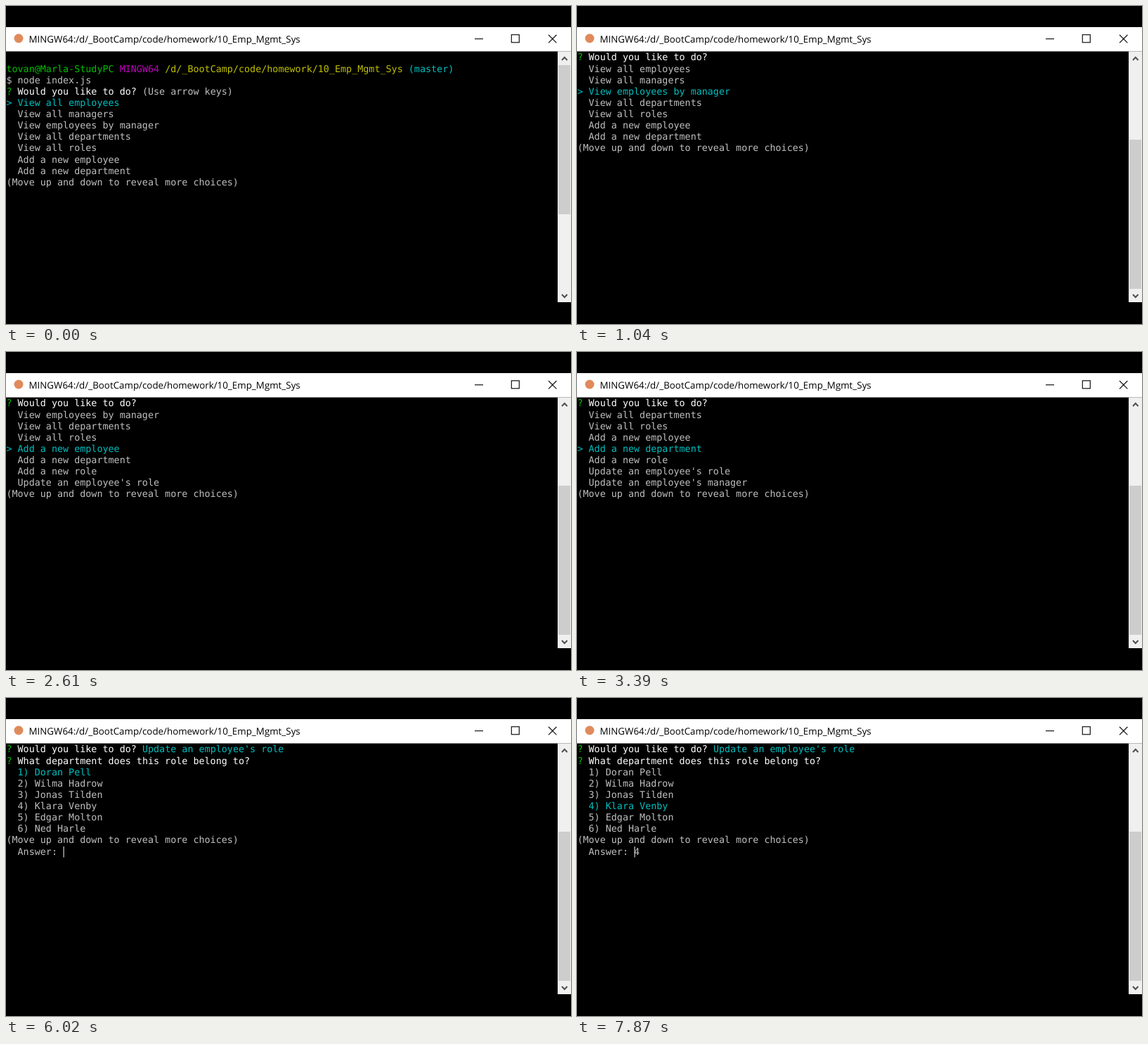
An HTML page that plays this animation: 804 px wide and 452 px high, repeating every 8000 ms.

```html
<!DOCTYPE html>
<html lang="en">
<head>
<meta charset="utf-8">
<title>Terminal menu</title>
<style>
  html, body { margin: 0; width: 100%; height: 100%; overflow: hidden; background: #000; }
  svg { display: block; width: 804px; height: 452px; }
  text { white-space: pre; text-rendering: geometricPrecision; }
  #title { font: 13.35px "Open Sans", "Noto Sans", sans-serif; fill: #000; }
  #lines { font: 13.4px "DejaVu Sans Mono", "Liberation Mono", monospace; }
  .gray { fill: #bfbfbf; }
  .white { fill: #fff; }
  .green { fill: #00bf00; }
  .cyan { fill: #00bfbf; }
  .yellow { fill: #bfbf00; }
  .magenta { fill: #bf00bf; }
</style>
</head>
<body>
<svg viewBox="0 0 804 452">
  <rect width="804" height="452"/>
  <rect y="30" width="804" height="34.5" fill="#fff"/>
  <circle cx="18" cy="46" r="6.5" fill="#e08a5c"/>
  <text id="title" x="32.5" y="51.7">MINGW64:/d/_BootCamp/code/homework/10_Emp_Mgmt_Sys</text>
  <g fill="none" stroke="#111" stroke-width="1.2">
    <path d="M667 46.7h12"/>
    <rect x="719.3" y="40.8" width="11" height="11"/>
    <path d="M772 41l11.4 11.4M783.4 41l-11.4 11.4"/>
  </g>
  <rect x="785" y="64.5" width="19" height="356.5" fill="#f0f0f0"/>
  <rect id="thumb" x="786" width="17" height="212" fill="#cdcdcd"/>
  <path d="M791 77l3.8-4 3.8 4M791 410l3.8 4 3.8-4" fill="none" stroke="#505050" stroke-width="2"/>
  <g id="lines"></g>
  <rect id="caret" x="81.5" y="211" width="1.2" height="15.5" fill="#d0d0d0"/>
</svg>
<script>
const LOOP = 8000, TOP = 77.4, PITCH = 16.13, LEFT = 0.4;
const NS = "http://www.w3.org/2000/svg";
const $ = id => document.getElementById(id);

const actions = [
  "View all employees", "View all managers", "View employees by manager",
  "View all departments", "View all roles", "Add a new employee",
  "Add a new department", "Add a new role", "Update an employee's role",
  "Update an employee's manager", "Delete an employee", "Exit"
];
const people = [
  "Doran Pell", "Wilma Hadrow", "Jonas Tilden",
  "Klara Venby", "Edgar Molton", "Ned Harle"
];

// A line is a list of [colour, text] runs.
const more = [["gray", "(Move up and down to reveal more choices)"]];
const ask = (text, ...rest) => [["green", "? "], ["white", text], ...rest];
const question = "Would you like to do?";

// Seven choices are visible; the pointer stays on the fourth once it gets there.
function choices(selected) {
  const first = Math.max(0, selected - 3);
  return actions.slice(first, first + 7).map((name, i) =>
    first + i === selected ? [["cyan", "> " + name]] : [["gray", "  " + name]]);
}

const start = () => [
  [],
  [["green", "tovan@Marla-StudyPC "], ["magenta", "MINGW64 "],
   ["yellow", "/d/_BootCamp/code/homework/10_Emp_Mgmt_Sys "], ["cyan", "(master)"]],
  [["gray", "$ node index.js"]],
  ask(question, ["gray", " (Use arrow keys)"]),
  ...choices(0),
  more
];
const menu = selected => () => [ask(question), ...choices(selected), more];
const pick = (selected, answer = "") => () => [
  ask(question, ["cyan", " Update an employee's role"]),
  ask("What department does this role belong to?"),
  ...people.map((name, i) => [[i === selected ? "cyan" : "gray", `  ${i + 1}) ${name}`]]),
  more,
  [["gray", "  Answer: " + answer]]
];

// [start time, screen, caret shown]
const steps = [
  [0, start],
  [520, () => [more]],
  [650, menu(1)],
  [780, menu(2)],
  [1300, menu(3)],
  [2090, menu(4)],
  [2610, menu(5)],
  [3390, menu(6)],
  [4040, menu(7)],
  [4560, menu(8)],
  [6020, pick(0), true],
  [6550, pick(0), false],
  [6940, pick(0), true],
  [7340, pick(1, "2"), true],
  [7600, pick(2, "3"), true],
  [7870, pick(3, "4"), true]
];

function textLine(runs, row) {
  const line = document.createElementNS(NS, "text");
  line.setAttribute("x", LEFT);
  line.setAttribute("y", TOP + row * PITCH);
  for (const [colour, text] of runs) {
    const run = document.createElementNS(NS, "tspan");
    run.setAttribute("class", colour);
    run.textContent = text;
    line.append(run);
  }
  return line;
}

let shown = -1;
function draw() {
  const t = performance.now() % LOOP;
  const index = steps.findLastIndex(step => step[0] <= t);
  if (index !== shown) {
    const [, screen, caret] = steps[index];
    $("lines").replaceChildren(...screen().map(textLine));
    $("thumb").setAttribute("y", index ? 190 : 84);
    $("caret").setAttribute("visibility", caret ? "visible" : "hidden");
    shown = index;
  }
  requestAnimationFrame(draw);
}
draw();
</script>
</body>
</html>
```
